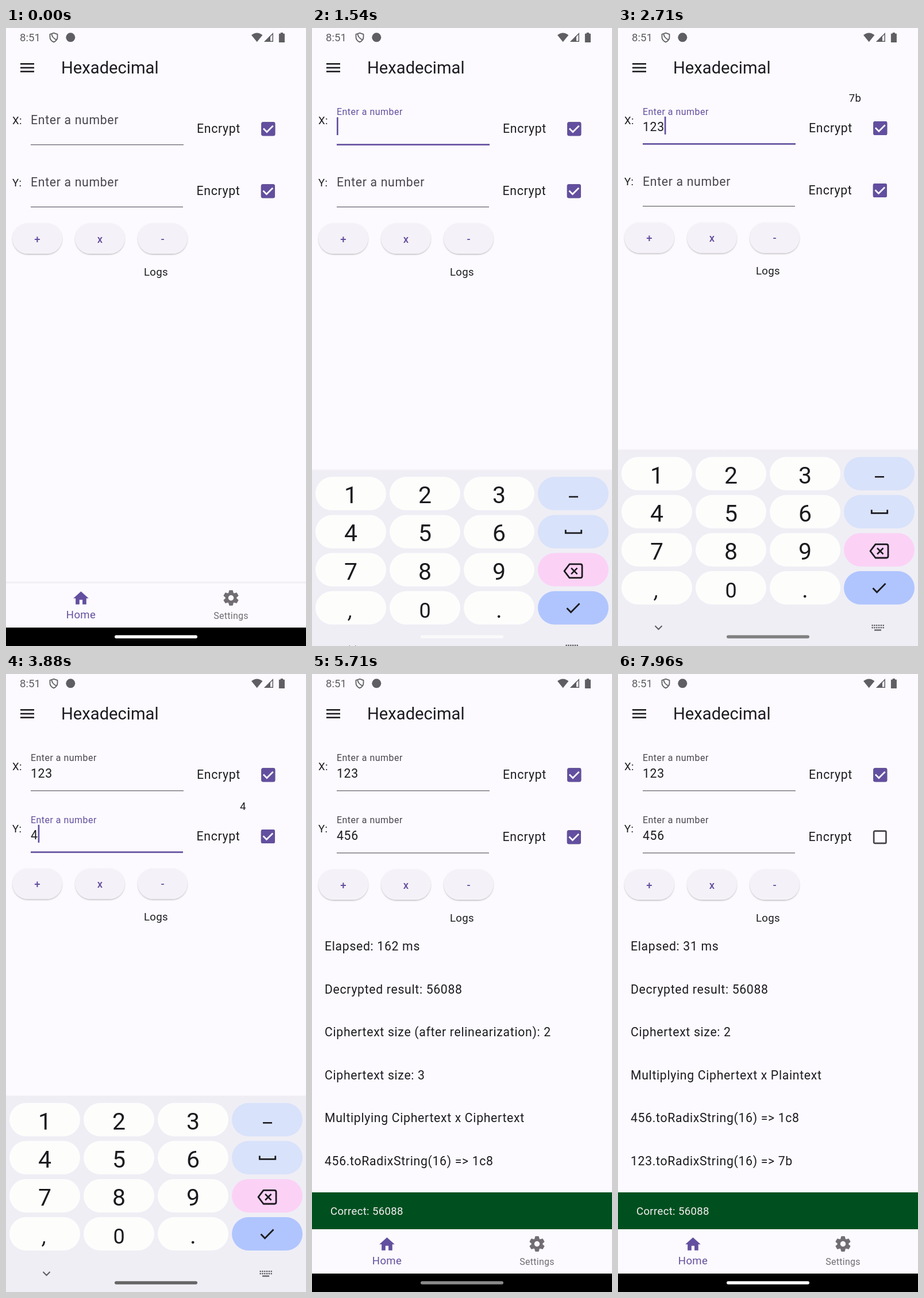
Animation of 522x1073 px, one loop 8 s. Source, as an HTML page:

```html
<!DOCTYPE html>
<html lang="en">
<head>
<meta charset="utf-8">
<title>Hexadecimal</title>
<style>
html, body { margin: 0; width: 522px; height: 1073px; overflow: hidden; background: #fcfafe; }
svg { display: block; }
text { font-family: Roboto, sans-serif; fill: #1c1b1f; white-space: pre; }
.title { font-size: 29.2px; }
.large { font-size: 21.26px; letter-spacing: .664px; }
.medium { font-size: 18.6px; letter-spacing: .33px; }
.small { font-size: 16px; letter-spacing: .25px; }
.op { font-size: 18.6px; font-weight: 500; fill: #634f9f; }
.key { font-size: 41px; }
.mid { text-anchor: middle; }
</style>
</head>
<body>
<svg id="stage" width="522" height="1073" viewBox="0 0 522 1073">
  <defs>
    <filter id="lift" x="-10%" y="-10%" width="120%" height="130%">
      <feDropShadow dx="0" dy="1.3" stdDeviation="1.1" flood-color="#000" flood-opacity=".28"/>
    </filter>
    <linearGradient id="edge" x1="0" y1="0" x2="0" y2="1">
      <stop offset="0" stop-color="#50405a" stop-opacity="0"/>
      <stop offset="1" stop-color="#50405a" stop-opacity=".09"/>
    </linearGradient>
  </defs>
</svg>
<script>
const LOOP = 8000, PURPLE = '#634f9f', GREY = '#49454f', INK = '#1c1b1f';
const KB_TOP = 734, KB_TRAVEL = 339, NAV_TOP = 964, SNACK_H = 64;
const SHOW_KB = 1360, HIDE_KB = 5150, RESULT = 5080, UNCHECK = 6500, RESULT2 = 7300;
const stage = document.getElementById('stage');

function add(parent, tag, attrs = {}, content = '') {
  const el = document.createElementNS('http://www.w3.org/2000/svg', tag);
  set(el, attrs);
  el.textContent = content;
  parent.append(el);
  return el;
}
function set(el, attrs) {
  for (const k in attrs) el.setAttribute(k, attrs[k]);
}
const group = (parent, x = 0, y = 0) => add(parent, 'g', { transform: `translate(${x} ${y})` });
const move = (el, x, y) => el.setAttribute('transform', `translate(${x} ${y})`);
const rect = (parent, x, y, width, height, fill, rx = 0) =>
  add(parent, 'rect', { x, y, width, height, fill, rx });
const text = (parent, x, y, cls, content, attrs = {}) =>
  add(parent, 'text', { x, y, class: cls, ...attrs }, content);
const fillPath = (parent, d, fill) => add(parent, 'path', { d, fill });
const line = (parent, d, stroke, width) =>
  add(parent, 'path', { d, stroke, fill: 'none', 'stroke-width': width });

const clamp = v => Math.max(0, Math.min(1, v));
const span = (t, start, length) => clamp((t - start) / length);
const easeOut = u => 1 - (1 - u) ** 3;
const easeInOut = u => u * u * (3 - 2 * u);
const mix = (a, b, u) => a + (b - a) * u;

// Page
rect(stage, 0, 0, 522, 1073, '#fcfafe');
buildStatus(group(stage));
for (const y of [61, 67.7, 74.3]) rect(stage, 25, y, 24, 2.6, INK);
text(stage, 96, 78.5, 'title', 'Hexadecimal');

const fieldX = buildField(stage, 0, 'X:', 309, {
  focus: 1290, blur: 3150, keys: [[1950, '1', '1'], [2200, '12', 'c'], [2450, '123', '7b']]
});
const lower = group(stage);
const fieldY = buildField(lower, 108, 'Y:', 308, {
  focus: 3150, blur: RESULT, keys: [[3650, '4', '4'], [3950, '45', '2d'], [4250, '456', '1c8']]
});
const ops = group(lower);
['+', 'x', '-'].forEach((label, i) => {
  const x = 11.5 + 109 * i;
  set(rect(ops, x, 339, 86, 53, '#f5f1f8', 26.5), { filter: 'url(#lift)' });
  text(ops, x + 43, 372.5, 'op mid', label);
});
text(ops, 261, 429.5, 'medium mid', 'Logs');

const runs = [
  ['Elapsed: 162 ms', 'Decrypted result: 56088', 'Ciphertext size (after relinearization): 2',
    'Ciphertext size: 3', 'Multiplying Ciphertext x Ciphertext', '456.toRadixString(16) => 1c8'],
  ['Elapsed: 31 ms', 'Decrypted result: 56088', 'Ciphertext size: 2',
    'Multiplying Ciphertext x Plaintext', '456.toRadixString(16) => 1c8', '123.toRadixString(16) => 7b']
].map(rows => {
  const g = group(stage);
  rows.forEach((row, i) => text(g, 22, 480 + 74.5 * i, 'large', row));
  return g;
});

buildNav(group(stage));
rect(stage, 0, 1041, 522, 32, '#000');

const snack = group(stage);
rect(snack, 0, 0, 522, SNACK_H, '#00501f');
text(snack, 32, 38.8, 'medium', 'Correct: 56088', { style: 'fill:#f4eff4' });

const keyboard = group(stage);
buildKeyboard(keyboard);
const pill = rect(stage, 189, 1054.3, 144, 5.4, '#fff', 2.7);

function buildStatus(g) {
  const c = '#5f5e63';
  text(g, 24, 23.2, 'medium', '8:51', { style: `fill:${c};letter-spacing:0` });
  line(g, 'M83 8.6 89.5 11V16Q89.5 21.6 83 24.4 76.5 21.6 76.5 16V11Z', c, 1.8);
  line(g, 'M79.5 10.5Q80 16.5 87.5 20.5', c, 1.8);
  add(g, 'circle', { cx: 112.3, cy: 16.3, r: 8, fill: c });
  fillPath(g, 'M427 12.3Q436.7 4.6 446.4 12.3L436.7 24.2Z', c);
  line(g, 'M464.2 9.8V23.2H451Z', c, 1.5);
  fillPath(g, 'M449 24 460 13V24Z', c);
  fillPath(g, 'M477.7 8h4.4v1.8h2.8V25h-10V9.8h2.8Z', c);
}

function buildField(parent, dy, name, right, plan) {
  const g = group(parent, 0, dy);
  text(g, 11, 166.6, 'medium', name);
  const hex = text(g, 412.5, 127.5, 'medium mid', '');
  const label = text(g, 0, 0, 'large', 'Enter a number');
  const row = group(g);
  const value = text(row, 43, 180, 'large', '');
  const rule = rect(row, 43, 0, right - 43, 1, GREY);
  const caret = rect(row, 43, 155, 2.66, 31, PURPLE);
  text(row, right === 309 ? 332 : 331.5, 182, 'large', 'Encrypt');
  const cx = dy ? 455.8 : 456.3;
  const ripple = add(row, 'circle', { cx, cy: 175.3, r: 0, fill: PURPLE });
  const box = group(row, cx - 12, 163.3);
  rect(box, 1.33, 1.33, 21.3, 21.3, 'none', 2).setAttribute('stroke', '#45414a');
  set(box.firstChild, { 'stroke-width': 2.66 });
  const on = group(box);
  rect(on, 0, 0, 24, 24, PURPLE, 2.7);
  line(on, 'M3.6 11.2 9.6 17.2 20.4 6.4', '#fff', 2.66);
  return { plan, hex, label, row, value, rule, caret, ripple, on };
}

// Returns true while the hex preview is shown.
function drawField(f, t) {
  const { focus, blur, keys } = f.plan;
  const typed = keys.filter(k => t >= k[0]).pop();
  const active = t >= focus && t < blur;
  const preview = active && !!typed;
  const u = easeInOut(span(t, focus, 167));
  const value = typed ? typed[1] : '';
  f.label.setAttribute('transform', `translate(43 ${mix(167, 150.5, u)}) scale(${mix(1, .75, u)})`);
  f.label.style.fill = active ? PURPLE : GREY;
  f.value.textContent = value;
  f.hex.textContent = preview ? typed[2] : '';
  set(f.rule, { y: active ? 201.2 : 202, height: active ? 2.66 : 1.33, fill: active ? PURPLE : '#6f6a74' });
  const since = t - (typed ? typed[0] : focus);
  set(f.caret, {
    x: 43 + value.length * 12.6,
    visibility: active && since % 1000 < 500 ? 'visible' : 'hidden'
  });
  move(f.row, 0, preview ? -1.2 : 0);
  return preview;
}

function buildNav(g) {
  rect(g, 0, NAV_TOP - 4, 522, 4, 'url(#edge)');
  rect(g, 0, NAV_TOP, 522, 77, '#fcfafe');
  const home = add(g, 'g', { transform: 'translate(114.5 974.2) scale(1.329)' });
  fillPath(home, 'M10 20v-6h4v6h5v-8h3L12 3 2 12h3v8z', PURPLE);
  text(g, 130.5, 1025, 'medium mid', 'Home', { style: `fill:${PURPLE}` });
  const c = '#716d73', gear = group(g, 391.5, 989.5);
  add(gear, 'circle', { r: 9.6, fill: c });
  for (let a = 0; a < 360; a += 60) {
    set(fillPath(gear, 'M-4.2-7 -2.8-12.8H2.8L4.2-7Z', c), {
      transform: `rotate(${a})`, stroke: c, 'stroke-width': 1, 'stroke-linejoin': 'round'
    });
  }
  add(gear, 'circle', { r: 4.7, fill: '#fcfafe' });
  text(g, 391.5, 1026, 'small mid', 'Settings', { style: `fill:${c}` });
}

function buildKeyboard(g) {
  rect(g, 0, KB_TOP - 3, 522, 3, 'url(#edge)');
  rect(g, 0, KB_TOP, 522, 345, '#efeef5');
  const tints = ['#d8e2fa', '#d8e2fa', '#fbd2f6', '#b0c5fe'];
  const faces = ['123', '456', '789', ',0.'];
  for (let r = 0; r < 4; r++) {
    for (let c = 0; c < 4; c++) {
      const x = 6 + 129 * c, y = 744.7 + 66.1 * r;
      rect(g, x, y, 123, 58, c < 3 ? '#fdfdfc' : tints[r], 29);
      if (c === 3) continue;
      const ch = faces[r][c];
      const style = ch === '0' ? 'font-size:36px' : ch === ',' ? 'font-style:italic;font-size:36px' : '';
      text(g, x + 61.5, y + 46, 'key mid', ch, { style });
    }
  }
  line(g, 'M447 779.3H463', INK, 2.6);
  line(g, 'M441.3 836.5V842.3H468.7V836.5', INK, 2.8);
  set(line(g, 'M448 896.3H467Q470 896.3 470 899.3V917Q470 920 467 920H448L439 908.2Z', INK, 2.8),
    { 'stroke-linejoin': 'round' });
  line(g, 'M451 903 461.5 913.5M461.5 903 451 913.5', INK, 2.6);
  line(g, 'M443.5 972.5 450.5 979.8 465.5 964.5', INK, 2.8);
  line(g, 'M64.5 1038 70.5 1044 76.5 1038', '#5b5a60', 2);
  for (let y = 0; y < 2; y++)
    for (let x = 0; x < 6; x++) rect(g, 441.5 + 3.8 * x, 1036 + 4 * y, 2.3, 2.3, '#5b5a60');
  rect(g, 446, 1044.3, 12, 2.2, '#5b5a60');
}

// Gesture bar brightness: time, level
const pillSteps = [[0, 250], [1750, 250], [1950, 128], [3300, 128], [3500, 102], [5350, 102],
  [5600, 138], [5900, 138], [6300, 250], [LOOP, 250]];
function pillLevel(t) {
  const i = pillSteps.findIndex(s => s[0] > t);
  const [t0, a] = pillSteps[i - 1], [t1, b] = pillSteps[i];
  return Math.round(mix(a, b, (t - t0) / (t1 - t0)));
}

function draw(t) {
  move(lower, 0, drawField(fieldX, t) ? -1.2 : 0);
  move(ops, 0, drawField(fieldY, t) ? -1.2 : 0);

  const tick = span(t, UNCHECK, 180);
  fieldY.on.setAttribute('opacity', 1 - tick);
  set(fieldY.ripple, {
    r: 26.6 * easeOut(span(t, UNCHECK - 60, 200)),
    opacity: .1 * (1 - span(t, UNCHECK + 140, 200))
  });

  runs[0].setAttribute('visibility', t >= RESULT && t < RESULT2 ? 'visible' : 'hidden');
  runs[1].setAttribute('visibility', t >= RESULT2 ? 'visible' : 'hidden');

  const up = easeOut(span(t, SHOW_KB, 340)) - easeInOut(span(t, HIDE_KB, 300));
  const drop = KB_TRAVEL * (1 - up);
  move(keyboard, 0, drop);
  keyboard.setAttribute('visibility', up > 0 ? 'visible' : 'hidden');
  move(snack, 0, Math.min(KB_TOP + drop, NAV_TOP) - SNACK_H);
  snack.setAttribute('visibility', t >= RESULT ? 'visible' : 'hidden');

  const v = pillLevel(t);
  pill.setAttribute('fill', `rgb(${v},${v},${v})`);
}

function loop() {
  draw(performance.now() % LOOP);
  requestAnimationFrame(loop);
}
loop();
</script>
</body>
</html>
```
